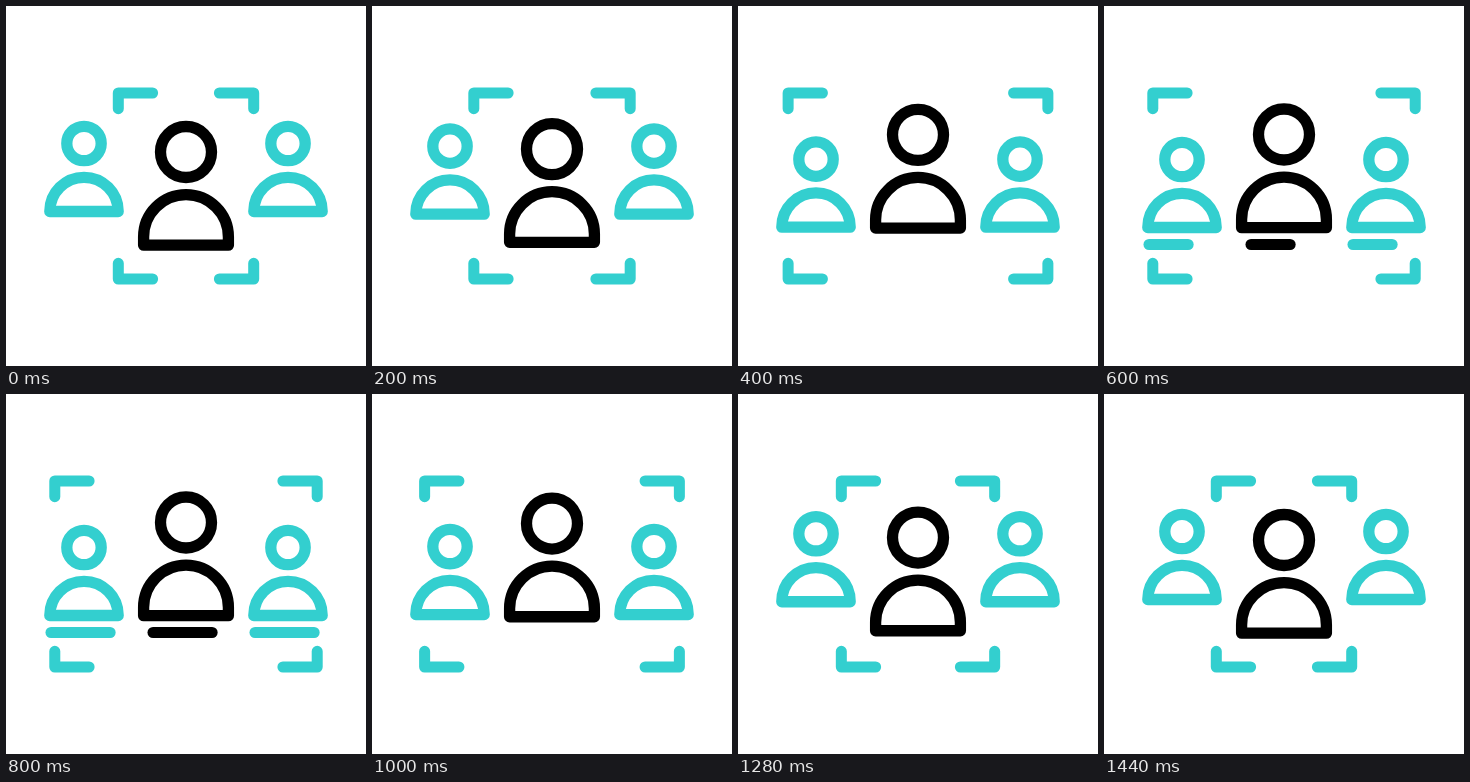
These frames come from a looping animation (360x360 px, 1480 ms). An HTML page with a canvas:

```html
<!DOCTYPE html>
<html lang="en">
<head>
<meta charset="utf-8">
<title>People focus</title>
<style>
  html, body { margin: 0; width: 100%; height: 100%; overflow: hidden; background: #fff; }
  canvas { display: block; width: 360px; height: 360px; }
</style>
</head>
<body>
<canvas id="stage" width="360" height="360"></canvas>
<script>
const ctx = document.getElementById('stage').getContext('2d');
const LOOP = 1480, STEP = 40;
const TEAL = '#33cfcf', BLACK = '#000';

const mix = (a, b, p) => a + (b - a) * p;

// Ease-in-out along a cubic Bezier with horizontal handles.
function ease(u) {
  if (u <= 0) return 0;
  if (u >= 1) return 1;
  let lo = 0, hi = 1;
  for (let i = 0; i < 24; i++) {
    const s = (lo + hi) / 2, r = 1 - s;
    const x = 3 * r * r * s * 0.38 + 3 * r * s * s * 0.48 + s * s * s;
    if (x < u) lo = s; else hi = s;
  }
  return lo * lo * (3 - 2 * lo);
}

const ramp = (t, from, to) => ease((t - from) / (to - from));

function stroke(color, width, trace) {
  ctx.strokeStyle = color;
  ctx.lineWidth = width;
  ctx.beginPath();
  trace();
  ctx.stroke();
}

function person(color, x, headY, headR, baseY, bodyR, bodyH) {
  stroke(color, 11.3, () => ctx.arc(x, headY, headR, 0, Math.PI * 2));
  stroke(color, 11.3, () => {
    ctx.moveTo(x - bodyR, baseY);
    ctx.arc(x, baseY - bodyH + bodyR, bodyR, Math.PI, 0);
    ctx.lineTo(x + bodyR, baseY);
    ctx.closePath();
  });
}

function bracket(sx, sy, spread) {
  const x = 180 + sx * spread, y = 180 + sy * 93;
  stroke(TEAL, 11, () => {
    ctx.moveTo(x - sx * 34.3, y);
    ctx.lineTo(x, y);
    ctx.lineTo(x, y - sy * 15.7);
  });
}

function underline(color, x, p) {
  if (p <= 0.002) return;
  stroke(color, 11, () => {
    ctx.moveTo(x - 33, 238.5);
    ctx.lineTo(x - 33 + 66 * p, 238.5);
  });
}

function draw(t) {
  const open = ramp(t, 120, 440) - ramp(t, 920, 1440);
  const line = ramp(t, 440, 760) - ramp(t, 760, 960);

  ctx.fillStyle = '#fff';
  ctx.fillRect(0, 0, 360, 360);
  ctx.lineCap = ctx.lineJoin = 'round';

  const spread = mix(67.7, 131.2, open);
  for (const sx of [-1, 1]) {
    for (const sy of [-1, 1]) bracket(sx, sy, spread);
  }

  const drop = 16 * open, rise = 17.5 * open;
  for (const x of [78, 282]) {
    person(TEAL, x, 137.5 + drop, 17.2, 205.5 + drop, 34.2, 34.2);
    underline(TEAL, x, line);
  }
  person(BLACK, 180, 146 - rise, 25.5, 239.2 - rise, 42.4, 50.6);
  underline(BLACK, 180, line);
}

function tick() {
  const t = performance.now() % LOOP;
  draw(Math.floor(t / STEP) * STEP);
  requestAnimationFrame(tick);
}
tick();
</script>
</body>
</html>
```
